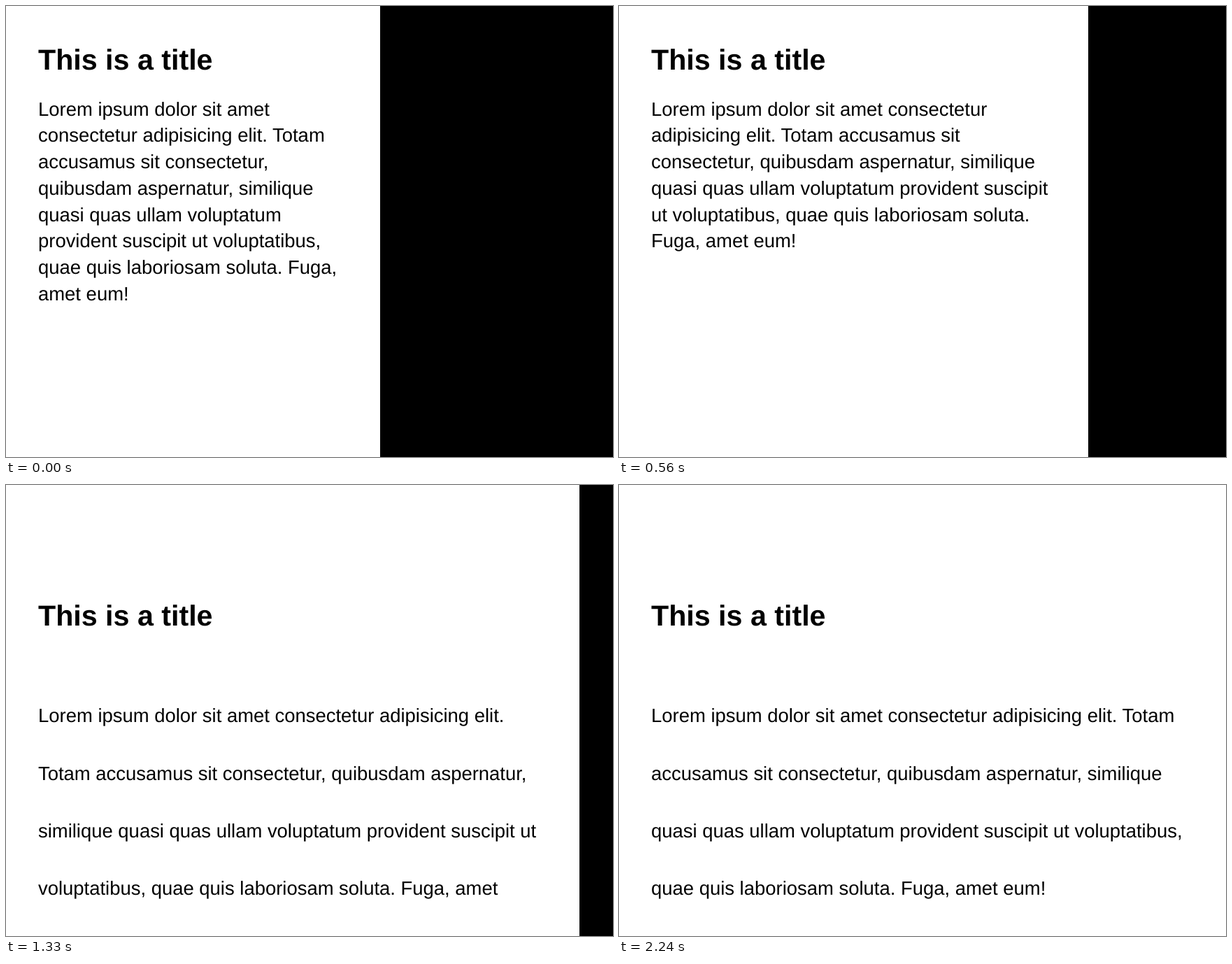
Recreate the animation shown at these times as an HTML page. Size 868x645 px, loop 2310 ms.

```html
<!DOCTYPE html>
<html lang="en">
<head>
<meta charset="utf-8">
<title>Line height at a breakpoint</title>
<style>
  html, body { margin: 0; width: 100%; height: 100%; overflow: hidden; background: #000; }
  #panel {
    position: absolute; left: 0; top: 0; height: 645px; overflow: hidden;
    background: #fff; color: #000;
    font: 27.45px "Liberation Sans", Arial, Helvetica, sans-serif;
    text-rendering: geometricPrecision;
  }
  h1, p { position: absolute; left: 46px; margin: 0; }
  h1 { top: 49px; font-size: 41.2px; line-height: 56px; white-space: nowrap; }
  p { top: 128.7px; right: 51.5px; line-height: 37.71px; }
  .wide h1 { top: 159px; }
  .wide p { top: 289.3px; line-height: 82.35px; }
</style>
</head>
<body>
<div id="panel">
  <h1>This is a title</h1>
  <p>Lorem ipsum dolor sit amet consectetur adipisicing elit. Totam accusamus sit consectetur, quibusdam aspernatur, similique quasi quas ullam voluptatum provident suscipit ut voluptatibus, quae quis laboriosam soluta. Fuga, amet eum!</p>
</div>
<script>
  const LOOP = 2310, STEP = 70, BREAKPOINT = 767;
  // [time in ms, panel width in px]
  const widths = [[0, 535], [280, 600], [560, 671], [840, 729], [1120, 793],
                  [1330, 820], [1680, 861], [1750, 870], [LOOP, 870]];
  const panel = document.getElementById("panel");

  function widthAt(t) {
    const i = widths.findIndex(([time]) => time > t);
    const [t0, w0] = widths[i - 1], [t1, w1] = widths[i];
    return Math.round(w0 + (w1 - w0) * (t - t0) / (t1 - t0));
  }

  function draw() {
    const t = Math.floor((performance.now() % LOOP) / STEP) * STEP;
    const width = widthAt(t);
    panel.style.width = width + "px";
    panel.classList.toggle("wide", width >= BREAKPOINT);
    requestAnimationFrame(draw);
  }
  draw();
</script>
</body>
</html>
```
